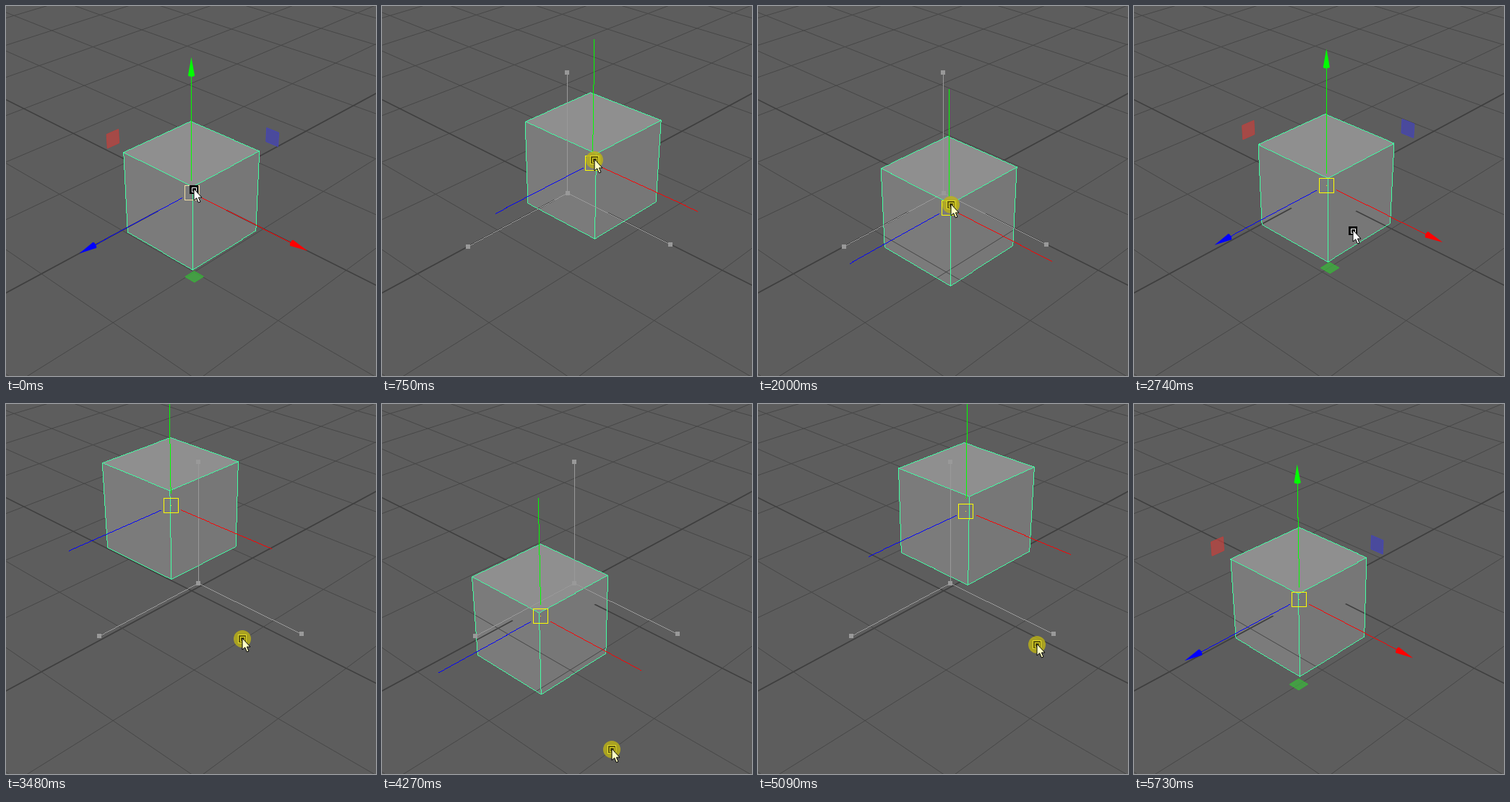
Recreate the animation shown at these times as an HTML page with a canvas. Size 512 px wide and 512 px high, loop 6720 ms.

```html
<!DOCTYPE html>
<html lang="en">
<head>
<meta charset="utf-8">
<title>Moving a cube</title>
<style>
html, body { margin: 0; height: 100%; overflow: hidden; background: #5d5d5d; }
canvas { display: block; width: 512px; height: 512px; }
</style>
</head>
<body>
<canvas id="stage" width="512" height="512"></canvas>
<script>
const ctx = document.getElementById('stage').getContext('2d');
const LOOP = 6720, TURN = 2 * Math.PI;
const PRESS = 40, DRAG1 = 370, RELEASE = 2560, DRAG2 = 3000, END = 5730;

// Camera: looks at the origin; the cube spans -1..1 and grid cells are 2 wide.
const CX = 257, CY = 258.5, FOCAL = 1162, DIST = 18, ROLL = 0.003;
const azimuth = Math.PI / 4 - 0.0145, elevation = Math.asin(0.52);
const sa = Math.sin(azimuth), ca = Math.cos(azimuth);
const se = Math.sin(elevation), ce = Math.cos(elevation);

// Each drag circles clockwise around a centre through a few key points.
const STRETCH = 1.25;
const drag1 = {
  centre: [258, 240],
  keys: [
    { t: DRAG1, x: CX, y: CY, laps: 0 },
    { t: 1310, x: 286.6, y: 185, laps: 1 },
    { t: 2000, x: 264.7, y: 280, laps: 1 },
    { t: 2540, x: 266, y: 248, laps: 0 }
  ]
};
const drag2 = {
  centre: [240, 222],
  keys: [
    { t: 3040, x: 266, y: 248, laps: 0 },
    { t: 3480, x: 228, y: 141, laps: 0 },
    { t: 4270, x: 221, y: 294, laps: 0 },
    { t: 5090, x: 287.4, y: 148, laps: 1 },
    { t: END, x: 229, y: 270, laps: 0 }
  ]
};

const mix = (a, b, s) => a + (b - a) * s;
const clamp = (v, lo, hi) => Math.min(Math.max(v, lo), hi);

function circleAlong({ centre: [cx, cy], keys }, t) {
  t = clamp(t, keys[0].t, keys[keys.length - 1].t);
  const i = Math.max(keys.findIndex(k => k.t >= t), 1);
  const a = keys[i - 1], b = keys[i];
  const s = (t - a.t) / (b.t - a.t);
  const [from, to] = [a, b].map(k => Math.atan2(k.y - cy, (k.x - cx) / STRETCH));
  const [r0, r1] = [a, b].map(k => Math.hypot(k.y - cy, (k.x - cx) / STRETCH));
  const sweep = (to - from + TURN) % TURN + b.laps * TURN;
  const angle = from + sweep * s, radius = mix(r0, r1, s);
  return [cx + STRETCH * radius * Math.cos(angle), cy + radius * Math.sin(angle)];
}

// World point to pixels; the object is moved in the view plane to `at`.
function project([x, y, z], at = [CX, CY]) {
  const near = x * sa + z * ca;
  const right = x * ca - z * sa, up = y * ce - near * se;
  const depth = DIST - y * se - near * ce;
  return [
    CX + ((right - ROLL * up) * FOCAL + (at[0] - CX) * DIST) / depth,
    CY - ((up + ROLL * right) * FOCAL - (at[1] - CY) * DIST) / depth
  ];
}

function trace(points) {
  ctx.beginPath();
  points.forEach(p => ctx.lineTo(...p));
  ctx.closePath();
}

function softLine(a, b, color, width) {
  ctx.beginPath();
  ctx.moveTo(...a);
  ctx.lineTo(...b);
  ctx.strokeStyle = color;
  ctx.lineWidth = width;
  ctx.stroke();
}

// Hard line, one pixel wide.
function pixelLine(a, b, color) {
  const dx = b[0] - a[0], dy = b[1] - a[1];
  const steps = Math.ceil(Math.max(Math.abs(dx), Math.abs(dy)));
  ctx.fillStyle = color;
  for (let i = 0; i <= steps; i++) {
    ctx.fillRect(Math.floor(a[0] + dx * i / steps), Math.floor(a[1] + dy * i / steps), 1, 1);
  }
}

function polygon(points, fill, stroke) {
  trace(points);
  ctx.fillStyle = fill;
  ctx.fill();
  if (!stroke) return;
  ctx.strokeStyle = stroke;
  ctx.lineWidth = 1;
  ctx.stroke();
}

function drawGrid() {
  for (let k = -24; k <= 8; k += 2) {
    const color = k ? '#474747' : '#3f3f3f', width = k ? 1 : 1.7;
    softLine(project([-24, 0, k]), project([8, 0, k]), color, width);
    softLine(project([k, 0, -24]), project([k, 0, 8]), color, width);
  }
}

function drawCube(at) {
  const v = (x, y, z) => project([x, y, z], at);
  const left = top => [v(-1, top, 1), v(1, top, 1), v(1, -1, 1), v(-1, -1, 1)];
  const right = top => [v(1, top, 1), v(1, top, -1), v(1, -1, -1), v(1, -1, 1)];
  const roof = [v(-1, 1, -1), v(1, 1, -1), v(1, 1, 1), v(-1, 1, 1)];
  const faces = [[roof, '#8f8f8f'], [left(1), '#7b7b7b'], [right(1), '#777777']];
  faces.forEach(([points, color]) => polygon(points, color));

  // The ground lies in front of whatever part has sunk below it.
  const ground = (at[1] - CY) * DIST / FOCAL * ce;
  if (ground > -1) {
    const l = left(Math.min(ground, 1)), r = right(Math.min(ground, 1));
    ctx.save();
    trace([l[0], l[1], r[1], r[2], l[2], l[3]]);
    ctx.clip();
    drawGrid();
    ctx.restore();
  }

  faces.forEach(([points]) =>
    points.forEach((p, i) => pixelLine(p, points[(i + 1) % 4], '#43ffa3')));
}

const AXIS = 2.78, CONE = 2.72, TIP = 3.1;
const axes = [
  { color: '#f00', along: d => [d, 0, 0] },
  { color: '#0f0', along: d => [0, d, 0] },
  { color: '#00f', along: d => [0, 0, d] }
];

function drawStartMarker(at) {
  const o = project([0, 0, 0], at);
  const ends = axes.map(axis => project(axis.along(AXIS), at));
  ends.forEach(p => pixelLine(o, p, '#999'));
  ctx.fillStyle = '#999';
  [o, ...ends].forEach(([x, y]) => ctx.fillRect(Math.round(x) - 3, Math.round(y) - 3, 6, 6));
}

function drawCone(base, tip, color) {
  const dx = tip[0] - base[0], dy = tip[1] - base[1];
  ctx.save();
  ctx.translate(...base);
  ctx.rotate(Math.atan2(dy, dx));
  polygon([[0, -4.5], [Math.hypot(dx, dy), 0], [0, 4.5]], color);
  ctx.beginPath();
  ctx.ellipse(0, 0, 2, 4.5, 0, 0, TURN);
  ctx.fill();
  ctx.restore();
}

function drawHandles(at) {
  const square = (point, half) =>
    [[-1, -1], [1, -1], [1, 1], [-1, 1]].map(([i, j]) =>
      project(point(2.1 + i * half, 2.1 + j * half), at));
  polygon(square((i, j) => [0, i, j], 0.145), 'rgba(205,65,60,.65)', '#b8423e');
  polygon(square((i, j) => [i, j, 0], 0.145), 'rgba(65,65,190,.65)', '#4646b4');
  polygon(square((i, j) => [i, 0, j], 0.12), 'rgba(60,185,60,.7)', '#35b435');
  axes.forEach(({ color, along }) =>
    drawCone(project(along(CONE), at), project(along(TIP), at), color));
}

function drawGizmo(at, boxColor) {
  axes.forEach(({ color, along }) =>
    pixelLine(project(along(0.3), at), project(along(AXIS), at), color));
  const x = Math.floor(at[0]), y = Math.floor(at[1]);
  ctx.strokeStyle = ctx.fillStyle = boxColor;
  ctx.lineWidth = 1;
  ctx.strokeRect(x - 9.5, y - 9.5, 20, 20);
  ctx.fillRect(x, y, 1, 1);
}

function drawCursor([x, y], pressed) {
  ctx.save();
  ctx.translate(Math.floor(x), Math.floor(y));
  if (pressed) {
    ctx.beginPath();
    ctx.arc(0, 0, 12, 0, TURN);
    ctx.fillStyle = 'rgba(190,180,20,.8)';
    ctx.fill();
  }
  ctx.fillStyle = pressed ? '#5e580c' : '#000';
  ctx.fillRect(-6, -6, 12, 12);
  ctx.strokeStyle = pressed ? '#e6de2a' : '#fff';
  ctx.lineWidth = 1;
  if (pressed) ctx.strokeRect(-5.5, -5.5, 11, 11);
  ctx.strokeRect(-2.5, -2.5, 6, 6);
  polygon([[0, -1], [0, 15], [3.7, 11.8], [6.3, 18], [9, 17], [6.4, 11], [11, 11]],
    pressed ? '#ffffc4' : '#fff', '#000');
  ctx.restore();
}

// The second drag is held away from the gizmo, so the pointer first moves off.
function cursorAt(t, [x, y]) {
  const s = clamp((t - 2600) / 350, 0, 1), away = s * s * (3 - 2 * s);
  return [x + mix(3, 99, away), y + mix(-4, 185, away)];
}

function draw(t) {
  const at = circleAlong(t < RELEASE ? drag1 : drag2, t);
  const first = t >= DRAG1 && t < RELEASE;
  const second = t >= DRAG2 && t < END;

  ctx.fillStyle = '#5d5d5d';
  ctx.fillRect(0, 0, 512, 512);
  drawGrid();
  drawCube(at);
  if (first) drawStartMarker([CX, CY]);
  else if (second) drawStartMarker([266, 248]);
  else drawHandles(at);
  drawGizmo(at, t < DRAG1 ? '#f3dfa6' : '#ff0');
  if (t < END) drawCursor(cursorAt(t, at), t >= PRESS && t < RELEASE || second);
}

const begin = performance.now();
function tick() {
  draw((performance.now() - begin) % LOOP);
  requestAnimationFrame(tick);
}
tick();
</script>
</body>
</html>
```
